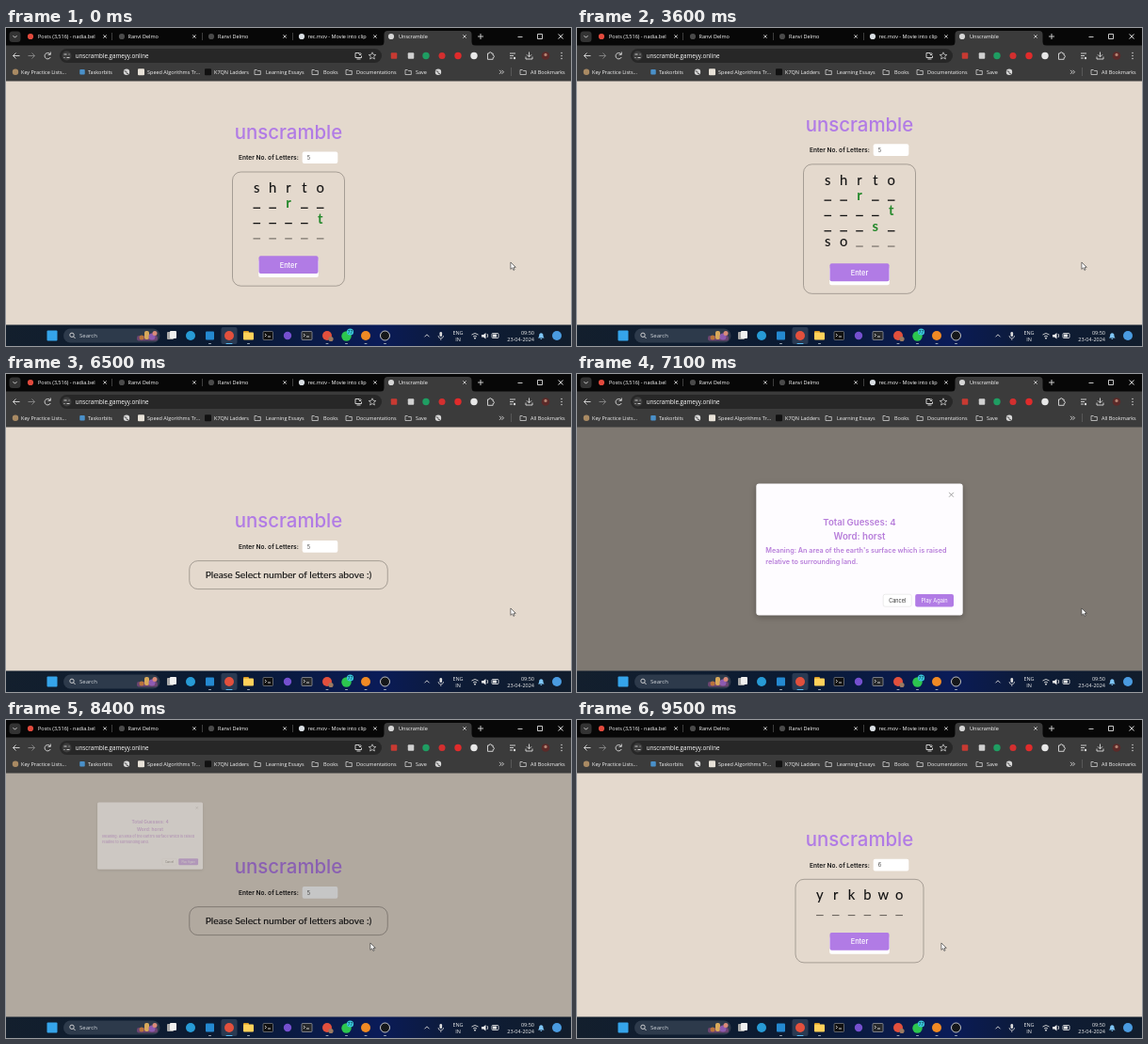
An HTML page that plays this animation: 600 by 338 pixels, repeating every 9.6 s.

```html
<!DOCTYPE html>
<html lang="en">
<head>
<meta charset="utf-8">
<title>Unscramble</title>
<style>
  html, body { margin: 0; width: 100%; height: 100%; overflow: hidden; background: #e4d9cd; }
  svg { display: block; width: 600px; height: 338px; }
  text { white-space: pre; }
  .ui { font-family: "Open Sans", sans-serif; }
  .page { font-family: Inter, sans-serif; }
  .game { font-family: Lato, sans-serif; }
  .raised { filter: drop-shadow(0 2px 3px #0004); }
</style>
</head>
<body>
<svg viewBox="0 0 600 338">
  <linearGradient id="bar">
    <stop stop-color="#131f2d"/>
    <stop offset=".4" stop-color="#0a1a33"/>
    <stop offset=".66" stop-color="#0a1b58"/>
    <stop offset=".8" stop-color="#0d1b36"/>
    <stop offset="1" stop-color="#111d2c"/>
  </linearGradient>
  <rect y="56" width="600" height="260" fill="#e4d9cd"/>
  <g id="form"></g>
  <rect id="shade" y="56" width="600" height="260"/>
  <g id="dialog"></g>
  <g id="browser"></g>
  <g id="taskbar"></g>
  <path id="cursor" d="M0 0V7.4L1.8 5.8 3 8.4 4.2 7.8 3.1 5.3H5.4Z" fill="#fff" stroke="#222" stroke-width=".6"/>
</svg>
<script>
const LOOP = 9600, PURPLE = '#b17be5', BLINK = 530, ANSWER = 'horst';
const $ = id => document.getElementById(id);
const clamp = v => Math.max(0, Math.min(1, v));
const ease = v => v * v * (3 - 2 * v);

const text = (x, y, s, size, fill = '#e6e6e6', extra = '') =>
  `<text x="${x}" y="${y}" font-size="${size}" fill="${fill}" ${extra}>${s}</text>`;
const mid = (x, y, s, size, fill, extra = '') => text(x, y, s, size, fill, 'text-anchor="middle" ' + extra);
const rect = (x, y, w, h, r, fill, extra = '') =>
  `<rect x="${x}" y="${y}" width="${w}" height="${h}" rx="${r}" fill="${fill}" ${extra}/>`;
const dot = (x, y, r, fill, extra = '') => `<circle cx="${x}" cy="${y}" r="${r}" fill="${fill}" ${extra}/>`;
const square = (x, y, size, fill) => rect(x - size / 2, y - size / 2, size, size, 1, fill);
const line = (d, color = '#ddd', w = .9) => `<path d="${d}" fill="none" stroke="${color}" stroke-width="${w}"/>`;
const cross = (x, y, r, color, w) => line(`M${x - r} ${y - r}l${2 * r} ${2 * r}m0 ${-2 * r}l${-2 * r} ${2 * r}`, color, w);
const folder = (x, y) => line(`M${x - 3} ${y - 2.3}h2.3l1 1h3v4h-6.3z`, '#d0d0d0', .8);
const globe = (x, y) => dot(x, y, 3.2, '#d8d8d8') + line(`M${x - 2.5} ${y - 1}q3 0 2.5 1.5t2 1.5`, '#444', .9);

function drawBrowser() {
  const tabs = [
    [26, 34, 'Posts (3,516) - nadia.bel', '#e34a3d', 105],
    [123, 129.5, 'Ranvi Delmo', '#4a4a4a', 200],
    [218, 225, 'Ranvi Delmo', '#4a4a4a', 296],
    [314, 320.5, 'rec.mov - Movie into clip', '#d8dde2', 392],
    [409, 417, 'Unscramble', '#d5d5d5', 487]
  ];
  const marks = [
    [16, 'Key Practice Lists...'], [87, 'Taskorbits'], [150, 'Speed Algorithms Tr...'],
    [221, 'K7QN Ladders'], [276, 'Learning Essays'], [337, 'Books'],
    [372, 'Documentations'], [435, 'Save'], [557, 'All Bookmarks']
  ];
  let s = rect(0, 0, 600, 20, 0, '#070707') + rect(0, 18.5, 600, 38, 0, '#3b3b3b')
    + '<path d="M397 19q4.5 0 4.5-4.5V7q0-4 4-4h85q4 0 4 4v7.500q0 4.500 4.500 4.500z" fill="#3b3b3b"/>'
    + rect(3.5, 3.5, 12, 11.5, 3.5, '#333') + line('M7.500 8.200l2 2 2-2');
  for (const [iconX, x, label, color, closeX] of tabs)
    s += dot(iconX, 9, 3.1, color) + text(x, 11.2, label, 5.5, '#fff', 'font-weight="500"') + cross(closeX, 9, 1.7, '#ddd', .8);
  s += line('M112.500 5v8M208.500 5v8M304.500 5v8', '#555', .7)
    + line('M501 9h6m-3-3v6M543.500 9.500h5M564.500 6.500h5v5h-5z') + cross(589, 9, 2.5, '#eee', .9);

  s += line('M14.500 29.500h-7m3-3l-3 3 3 3') + line('M23.500 29.500h7m-3-3l3 3-3 3', '#888')
    + line('M47 28a3.200 3.200 0 1 0 .2 3M47.300 25.500v2.800h-2.800')
    + rect(57, 22, 342, 15, 7.5, '#272727') + dot(64.5, 29.5, 5, '#3d3d3d')
    + line('M61.500 28h3m2 0h1M61.500 31.500h1m2 0h3') + text(73.7, 31.7, 'unscramble.gameyy.online', 6.25, '#fff')
    + line('M375 26.500h-4v5h6.500v-2M376 26v3m-1.500-1.500l1.500 1.500 1.500-1.500M372.500 33h4')
    + line('M389 25.800l1.100 2.500 2.700.2-2.100 1.800.7 2.700-2.400-1.500-2.400 1.500.7-2.700-2.100-1.800 2.700-.2z', '#ddd', .7)
    + square(412, 29.5, 6.5, '#c83a32') + square(430, 29.5, 6.5, '#d0d0d0') + dot(446, 29.5, 3.7, '#1f9d62')
    + dot(463, 29.5, 3.5, '#d32f2f') + dot(480, 29.5, 3.7, '#e02b2b') + dot(497, 29.5, 3.7, '#e8e8e8')
    + line('M511.500 27h1.500a1.300 1.300 0 0 1 2.600 0h1.500v2a1.300 1.300 0 0 1 0 2.600v1.700h-5.600z')
    + line('M535 27h6m-6 2.500h4m-4 2.500h3') + dot(540, 32, 1.2, '#ddd')
    + line('M555.500 25.500v5m-2.500-2.200l2.500 2.500 2.500-2.500M552 30.500v2.500h7v-2.500')
    + dot(573, 29.5, 4.3, '#5b2a29') + dot(573, 28.4, 1.6, '#b58473')
    + [26.5, 29.5, 32.5].map(y => dot(590, y, .7, '#e4e4e4')).join('');

  for (const [x, label] of marks) s += text(x, 48.8, label, 5.5, '#f4f4f4');
  s += dot(10, 46.8, 3.2, '#a98a63') + square(81, 46.8, 5.5, '#4a90c9') + globe(128, 46.8)
    + square(143.5, 46.8, 7, '#e8e2d8') + square(214.5, 46.8, 7, '#111') + globe(459, 46.8)
    + [267, 328, 364, 427, 549].map(x => folder(x, 46.8)).join('')
    + line('M524 44.800l2 2-2 2m2.500-4l2 2-2 2') + line('M536.500 42v9', '#666', .7);
  return s;
}

function drawTaskbar() {
  const y = 327;
  let s = rect(0, 315.5, 600, 22.5, 0, 'url(#bar)') + square(49, y, 11, '#35a4ea')
    + rect(61, 319.5, 102.5, 15, 7.5, '#2d3a4b') + dot(70, 326.3, 2.2, 'none', 'stroke="#ddd" stroke-width=".9"')
    + line('M71.600 328l2 2') + text(78, 329.2, 'Search', 6, '#d5d9de')
    + rect(139, 327, 22, 5.5, 2, '#6b4470') + dot(144, 329, 2.5, '#b9743c') + rect(147, 322, 5, 9, 2, '#d8a95a')
    + dot(155, 328, 3.5, '#8d5bb0') + dot(158, 324.5, 2.5, '#d98a78')
    + rect(228.500, 318, 17, 18, 2, '#2a3a52')
    + rect(171, 323, 7, 8, 1, '#aaa') + rect(174, 322, 7, 8, 1, '#f0f0f0')
    + dot(196, y, 5, '#279bd6') + square(216.5, y, 9, '#2489d1') + dot(237, y, 5, '#e2503d')
    + rect(252, 322, 6, 4, 1, '#d99a22') + rect(252, 323.5, 11, 8, 1, '#ffd15a')
    + rect(273, 322.5, 10.5, 9, 1, '#111', 'stroke="#999" stroke-width=".6"') + line('M275 325l1.500 1.500-1.500 1.500m3 0h3')
    + dot(299, y, 4.2, '#7550cf')
    + rect(314, 322.5, 11, 9, 1, '#27292c', 'stroke="#bbb" stroke-width=".6"') + line('M316 325l1.500 1.500-1.500 1.500m3 0h3')
    + dot(341, y, 5, '#e2503d') + dot(345, 330.5, 2.6, '#9a7a62')
    + dot(361.5, 327.500, 5.2, '#2cc64f') + dot(365.5, 323, 3.6, '#39c5d8') + mid(365.5, 324.8, '77', 4.6, '#072034')
    + dot(382, y, 5, '#f08a24') + dot(402.5, y, 5, '#15171a', 'stroke="#d5d5d5" stroke-width=".9"');
  for (const x of [216.5, 257.5, 341, 361.5, 382, 402.5]) s += rect(x - 1.5, 335, 3, 1, .5, '#96a3b0');
  s += rect(233.5, 335, 7, 1, .5, '#57b8ee')
    + line('M444.500 328.300l2.500-2.500 2.500 2.500') + rect(460.5, 323, 2.6, 5, 1.3, '#ddd') + line('M459 327a2.800 2.800 0 0 0 5.600 0M461.800 330v2', '#ddd', .7)
    + mid(480, 325.8, 'ENG', 5.5, '#f2f2f2') + mid(480, 333.2, 'IN', 5.5, '#f2f2f2')
    + line('M494.500 326q3.500-3 7 0M496 328q2-1.700 4 0') + dot(498, 329.7, .9, '#eee')
    + '<path d="M505 326h2l2.500-2v6.500l-2.500-2h-2z" fill="#eee"/>' + line('M511 325q1.500 2 0 4')
    + rect(516, 324.5, 7, 5, 1, 'none', 'stroke="#eee" stroke-width=".8"') + rect(517, 325.5, 4, 3, 0, '#eee')
    + text(561, 325.8, '09:50', 5.5, '#f2f2f2', 'text-anchor="end"') + text(561, 333.2, '23-04-2024', 5.5, '#f2f2f2', 'text-anchor="end"')
    + '<path d="M565 329.500q1.300-1 1.300-4 2-2.500 4 0 0 3 1.300 4zM567.300 330h2q-1 1.800-2 0z" fill="#7fc6f5"/>'
    + dot(585, y, 5, '#4a9be0');
  return s;
}

function drawDialog() {
  const tint = '#b77dda', bold = 'font-weight="600"';
  return rect(190.3, 116.6, 219.4, 139.8, 3, '#fefcff', 'class="raised"') + cross(397.5, 128.3, 2.4, '#8a8a8a', .8)
    + mid(300, 160.6, 'Total Guesses: 4', 9.6, tint, bold) + mid(300, 176.2, 'Word: horst', 9.7, tint, bold)
    + text(200.3, 189.7, "Meaning: An area of the earth's surface which is raised", 7.22, tint, bold)
    + text(200.3, 201.7, 'relative to surrounding land.', 7.22, tint, bold)
    + rect(325.2, 234.2, 30, 13, 2, '#fff', 'stroke="#d9d9d9" stroke-width=".5"') + mid(340.2, 242.9, 'Cancel', 5.5, '#333')
    + rect(359.2, 234, 40.8, 13.4, 2, PURPLE) + mid(379.6, 242.9, 'Play Again', 5.7, '#fff');
}

// What the player has typed, by time.
const typing = [
  [-BLINK, ''], [200, 't'], [400, 'tr'], [600, 'tro'], [800, 'tros'], [1100, 'trosh'],
  [1510, ''], [3000, 's'], [3050, 'so'], [3900, 's'], [4100, ''], [4500, 'h'], [4800, 'ho'],
  [5700, 'hor'], [5800, 'hors'], [6000, 'horst']
];

function drawForm(t) {
  const idle = t >= 6500 && t < 9000, again = t >= 9000;
  const word = again ? 'yrkbwo' : 'shrto', n = word.length;
  const past = again ? [] : t < 1510 ? ['__r__', '____t'] : ['__r__', '____t', '___s_'];
  const rows = past.length + 2;
  const height = idle ? 30 : 56 + 16.3 * rows, width = idle ? 210.5 : 17 * n + 34;
  const top = 213.6 - height / 2;

  let s = '<g class="page">' + mid(300, top - 35.2, 'unscramble', 20.4, PURPLE, 'font-weight="500"')
    + text(247, top - 12.8, 'Enter No. of Letters:', 6.6, '#151515', 'font-weight="600"')
    + rect(314.7, top - 21.5, 37.6, 12.6, 2, '#fff') + text(319.7, top - 13, again ? 6 : 5, 5.6, '#444') + '</g>'
    + rect(300 - width / 2, top, width, height, 9, 'none', 'stroke="#67615b" stroke-width=".5"') + '<g class="game">';
  if (idle)
    return s + mid(300, top + 18.7, 'Please Select number of letters above :)', 10.28, '#111', 'stroke="#111" stroke-width=".12"') + '</g>';

  const colX = i => 300 + (i - (n - 1) / 2) * 16.85, rowY = i => top + 22 + 16.3 * i;
  const dash = (i, y, color, w) => line(`M${colX(i) - 3.8} ${y}h7.600`, color, w);
  const letter = (c, i, y) => mid(colX(i), y, c, 14.8, '#111', 'stroke="#111" stroke-width=".1"');

  [...word].forEach((c, i) => s += letter(c, i, rowY(0)));
  past.forEach((guess, r) => [...guess].forEach((c, i) => {
    const y = rowY(r + 1);
    s += c === ANSWER[i] ? mid(colX(i), y, c, 14.8, '#23882a', 'font-weight="700"') : dash(i, y, '#111', 1.3);
  }));

  const [since, guess] = again ? [-BLINK, ''] : typing.findLast(step => step[0] <= t);
  const y = rowY(rows - 1), focused = guess.length === n && t - since >= 200;
  for (let i = 0; i < n; i++) s += guess[i] ? letter(guess[i], i, y) : dash(i, y, '#625c56', 1);
  if (!again && !focused && Math.floor((t - since) / BLINK) % 2 === 0) {
    const x = guess.length < n ? colX(guess.length) : colX(n - 1) + 4.7;
    s += line(`M${x} ${y - 13}v15`, '#222', .7);
  }

  const buttonY = top + 24 + 16.3 * rows;
  s += '</g><g class="page">' + rect(268.2, buttonY + 4, 63.6, 18.8, 2, '#fff') + rect(268.5, buttonY, 63, 18.9, 2, PURPLE);
  if (focused) s += rect(267.6, buttonY - .4, 64.8, 22.6, 2.5, 'none', 'stroke="#8e76ac" stroke-width=".7"');
  return s + mid(300, buttonY + 12.4, 'Enter', 7.4, '#fff', 'font-weight="500"') + '</g>';
}

$('browser').innerHTML = `<g class="ui">${drawBrowser()}</g>`;
$('taskbar').innerHTML = `<g class="ui">${drawTaskbar()}</g>`;
$('dialog').innerHTML = `<g class="page">${drawDialog()}</g>`;

let shown = '';
function render(t) {
  const form = drawForm(t);
  if (form !== shown) $('form').innerHTML = shown = form;

  // The dialog grows from, and shrinks back to, the top left of the page.
  const open = t < 8000 ? ease(clamp((t - 6530) / 300)) : 1 - clamp((t - 8300) / 200);
  const scale = .03 + .97 * open;
  $('shade').setAttribute('opacity', .45 * open);
  $('dialog').setAttribute('opacity', open ** 1.4);
  $('dialog').setAttribute('transform', `translate(0 57) scale(${scale}) translate(0 -57)`);

  const move = ease(clamp((t - 7700) / 550));
  $('cursor').setAttribute('transform', `translate(${535.9 - 149 * move} ${249 - 12 * move})`);
}

const start = performance.now();
function tick() {
  render((performance.now() - start) % LOOP);
  requestAnimationFrame(tick);
}
tick();
</script>
</body>
</html>
```
